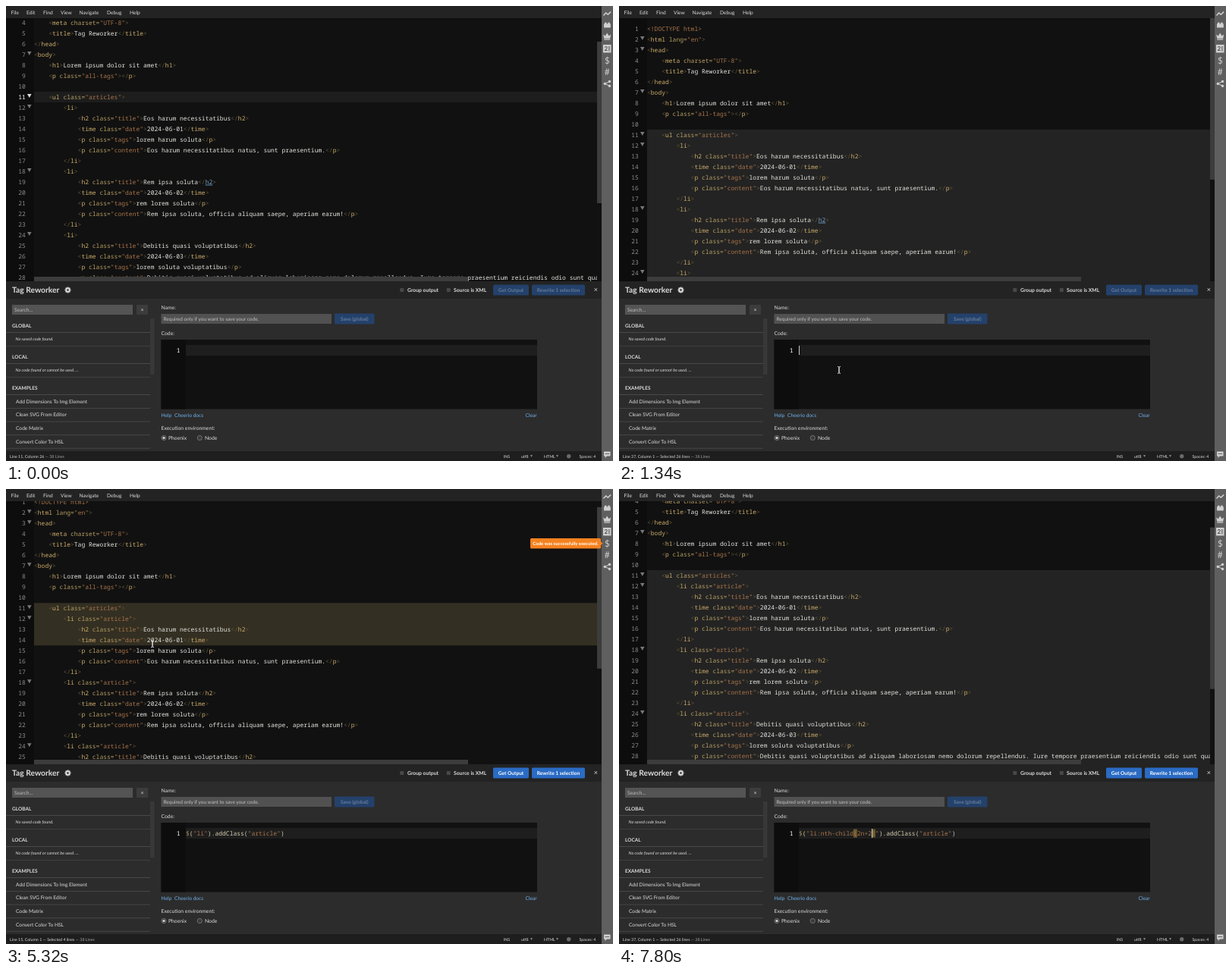
Animation of 800 by 600 pixels, one loop 8 s. Source, as an HTML page:

```html
<!DOCTYPE html>
<html lang="en">
<head>
<meta charset="UTF-8">
<title>Tag Reworker</title>
<style>
html, body { margin: 0; width: 100%; height: 100%; overflow: hidden; background: #111; }
svg { display: block; width: 100vw; height: 100vh; }
text { font-family: Lato, "Open Sans", sans-serif; fill: #dcdcdc; text-rendering: geometricPrecision; white-space: pre; }
.mono, .mono tspan { font-family: "Noto Sans Mono", "DejaVu Sans Mono", monospace; font-size: 8px; }
.br { fill: #62583a; }
.tag { fill: #cbab69; }
.attr { fill: #b69d62; }
.str { fill: #a8744a; }
.txt { fill: #e2e2de; }
.pun { fill: #d6ccb0; }
.dollar { fill: #96895c; }
.num { fill: #8c8c8c; }
.hot { fill: #fff; }
.match { fill: #6f9fc8; }
.line { text-decoration: underline; }
</style>
</head>
<body>
<svg id="stage" viewBox="0 0 800 600" preserveAspectRatio="none"></svg>
<script>
const LOOP = 8000, ROW = 14, TOP = 23, LEFT = 37, CH = 4.8;
const NAME = 'Tag Reworker';
const stage = document.getElementById('stage');
const $ = id => document.getElementById(id);
const esc = s => s.replace(/&/g, '&amp;').replace(/</g, '&lt;').replace(/>/g, '&gt;');

// ---- markup helpers ----
const rect = (x, y, w, h, fill, extra = '') =>
  `<rect x="${x}" y="${y}" width="${w}" height="${h}" fill="${fill}" ${extra}/>`;
const label = (x, cy, size, str, extra = '') =>
  `<text x="${x}" y="${cy + size * 0.35}" font-size="${size}" ${extra}>${esc(str)}</text>`;
const path = (d, extra) => `<path d="${d}" ${extra}/>`;
const span = (cls, s) => `<tspan class="${cls}">${esc(s)}</tspan>`;
const fill = c => `style="fill:${c}"`;

// ---- document being edited ----
const articles = [
  ['Eos harum necessitatibus', 'lorem harum soluta', 'Eos harum necessitatibus natus, sunt praesentium.'],
  ['Rem ipsa soluta', 'rem lorem soluta', 'Rem ipsa soluta, officia aliquam saepe, aperiam earum!'],
  ['Debitis quasi voluptatibus', 'lorem soluta voluptatibus', 'Debitis quasi voluptatibus ad aliquam laboriosam nemo dolorum repellendus. Iure tempore praesentium reiciendis odio sunt quam'],
  ['Magni omnis non', 'soluta omnis lorem', 'Magni omnis non maxime quis nisi officiis ab velit quo ipsum! Nam laborum molestias labore maiores vel deserunt quidem aperiam']
];
const doc = [
  '<!DOCTYPE html>', '<html lang="en">', '<head>', '    <meta charset="UTF-8">',
  `    <title>${NAME}</title>`, '</head>', '<body>',
  '    <h1>Lorem ipsum dolor sit amet</h1>', '    <p class="all-tags"></p>', '',
  '    <ul class="articles">'
];
articles.forEach(([title, tags, content], i) => doc.push(
  '        <li>',
  `            <h2 class="title">${title}</h2>`,
  `            <time class="date">2024-06-0${i + 1}</time>`,
  `            <p class="tags">${tags}</p>`,
  `            <p class="content">${content}</p>`,
  '        </li>'));
doc.push('    </ul>', '</body>', '</html>');
const folds = [2, 3, 7, 11, 12, 18, 24, 30];

const htmlToken = /<!.*>|<\/?|>|(?<=<\/?)\w+| \w+=|"[^"]*"|[^<>]+/g;
function paint(line) {
  let prev = '';
  return line.match(htmlToken).map(s => {
    const cls = s.startsWith('<!') ? 'str' : /^(<\/?|>)$/.test(s) ? 'br'
      : prev[0] === '<' ? 'tag' : /^ \w+=$/.test(s) ? 'attr' : s[0] === '"' ? 'str' : 'txt';
    prev = s;
    return span(cls, s);
  }).join('');
}
const rowMid = n => TOP + (n - 0.5) * ROW;
function codeRow(line, n, cls = '') {
  const body = line.trimStart();
  if (!body) return '';
  const x = LEFT + (line.length - body.length) * CH;
  return `<text class="mono ${cls}" x="${x}" y="${rowMid(n) + 2.7}">${paint(body)}</text>`;
}
function documentRows() {
  return doc.map((line, i) => {
    const n = i + 1;
    if (line.trim() === '<li>')
      return codeRow(line, n, 'before') + codeRow(line.replace('>', ' class="article">'), n, 'after');
    return codeRow(line, n, 'row' + n);
  }).join('');
}
function gutterRows() {
  const nums = doc.map((_, i) =>
    `<text id="num${i + 1}" class="mono num" text-anchor="end" x="25.8" y="${rowMid(i + 1) + 2.7}">${i + 1}</text>`);
  const marks = folds.map(n =>
    path(`M28 ${rowMid(n) - 4}h5.6l-2.8 5z`, `id="fold${n}" fill="#777"`));
  return nums.concat(marks).join('');
}

// ---- static interface ----
function menu() {
  const items = [['File', 6.5], ['Edit', 27], ['Find', 49], ['View', 72], ['Navigate', 96.5], ['Debug', 133], ['Help', 163]];
  return rect(0, 0, 785, 16, '#232323') + items.map(([s, x]) => label(x, 9, 6.65, s)).join('');
}
function sideIcons() {
  const c = '#d0d0d0', f = `fill="${c}"`, s = `fill="none" stroke="${c}"`;
  return rect(785, 0, 15, 600, '#5f5f5f') +
    path('M787.5 12.5l3.2-3.5 2.6 2.2 3.8-3.6', s + ' stroke-width="1.5"') +
    path('M788 28.5v-5h1v-1.8h2.6v1.8h1.6v-1.8h2.6v1.8h1v5z', f) +
    path('M787.2 37.5l2.6 2 2.4-4 2.4 4 2.6-2-1 5.2h-8zM788.2 43.5h8v1.3h-8z', f) +
    rect(787, 51, 10.5, 10.5, c) + label(788.4, 56.3, 8, '2', 'font-weight="700" ' + fill('#4a4a4a')) +
    rect(794.4, 53, 1, 6.5, '#4a4a4a') +
    label(792.3, 71.5, 11.5, '$', 'text-anchor="middle" ' + fill(c)) +
    label(792.3, 87, 12, '#', 'text-anchor="middle" ' + fill(c)) +
    path('M795.5 99.5l-6 3 6 3', s) +
    [[795.5, 99.5], [789.3, 102.5], [795.5, 105.5]].map(([x, y]) => `<circle cx="${x}" cy="${y}" r="1.7" ${f}/>`).join('') +
    path('M788 587.5h8.5v6h-4.5l-2.5 2.5v-2.5h-1.5z', f) + rect(789.5, 590, 5.5, 1, '#5f5f5f');
}
const button = (id, x, y, w, h, str) =>
  rect(x, y, w, h, '#24416b', `id="${id}" rx="1.5"`) +
  label(x + w / 2, y + h / 2, 6.6, str, `id="${id}Text" text-anchor="middle" font-weight="700" ` + fill('#657c98'));

function gear(x, y) {
  const teeth = [0, 45, 90, 135].map(a =>
    rect(x - 0.9, y - 4, 1.8, 8, '#dcdcdc', `transform="rotate(${a} ${x} ${y})"`)).join('');
  return teeth + `<circle cx="${x}" cy="${y}" r="2.9" fill="#dcdcdc"/><circle cx="${x}" cy="${y}" r="1.2" fill="#232323"/>`;
}
function panel() {
  const head = rect(0, 363, 785, 23, '#232323') + label(8, 374.8, 10.3, NAME, 'font-weight="700"') + gear(81.5, 374.5) +
    rect(519.3, 372, 5, 5, '#484848', 'rx=".8"') + label(529, 374.7, 6.8, 'Group output', 'font-weight="700"') +
    rect(580.8, 372, 5, 5, '#484848', 'rx=".8"') + label(590, 374.7, 6.8, 'Source is XML', 'font-weight="700"') +
    button('run', 642, 367.5, 47, 14, 'Get Output') + button('rewrite', 693, 367.5, 70, 14, 'Rewrite 1 selection') +
    label(777.3, 374, 9, '×', 'text-anchor="middle"');

  const heads = [['GLOBAL', 422], ['LOCAL', 463], ['EXAMPLES', 504]];
  const items = ['Add Dimensions To Img Element', 'Clean SVG From Editor', 'Code Matrix', 'Convert Color To HSL'];
  const it = 'font-style="italic"';
  const list = rect(8, 394, 159, 13, '#545454') + label(11, 400.5, 6.6, 'Search…', fill('#bdbdbd')) +
    rect(172, 394, 15, 13, '#3c3c3c', 'rx="1"') + label(179.5, 400.3, 7, '×', 'text-anchor="middle"') +
    rect(190, 412, 5.5, 74, '#383838') +
    heads.map(([s, y]) => label(8, y, 6.5, s, 'font-weight="700"') + rect(0, y + 8, 190, 1, '#494949')).join('') +
    label(12.5, 439.3, 5.6, 'No saved code found.', it) + label(12.5, 480.3, 5.6, 'No code found or cannot be used. …', it) +
    rect(0, 448, 190, 1, '#3e3e3e') + rect(0, 489, 190, 1, '#3e3e3e') +
    items.map((s, i) => label(13, 521.5 + i * 17.6, 6.65, s) + rect(0, 530 + i * 17.6, 190, 0.9, '#494949')).join('');

  const link = fill('#6fb1ee');
  const form = label(204.5, 398, 6.8, 'Name:') + rect(204.5, 406, 224.5, 13, '#515151') +
    label(207.5, 412.5, 6.5, 'Required only if you want to save your code.', fill('#c2c2c2')) +
    button('save', 433, 405.5, 52.5, 14, 'Save (global)') +
    label(204.5, 432, 6.8, 'Code:') + rect(204.5, 440, 495.5, 91.5, '#111') + rect(204.5, 440, 32.5, 91.5, '#0d0d0d') +
    rect(237, 447, 463, 14, '#1e1e1e') +
    '<text class="mono hot" text-anchor="end" x="229.5" y="456.7">1</text>' +
    '<g id="pairs"></g><text id="input" class="mono" x="237" y="456.7"></text>' + rect(0, 448, 0.9, 12, '#ddd', 'id="caret"') +
    label(204.5, 540, 6.65, 'Help', link) + label(222, 540, 6.65, 'Cheerio docs', link) + label(684.5, 540, 6.65, 'Clear', link) +
    label(204.5, 557, 6.8, 'Execution environment:') +
    '<g fill="#3a3a3a" stroke="#8a8a8a" stroke-width=".7"><circle cx="208" cy="569.5" r="3.1"/><circle cx="255.3" cy="569.5" r="3.1"/></g>' +
    '<circle cx="208" cy="569.5" r="1.6" fill="#ddd"/>' +
    label(214, 570, 6.8, 'Phoenix') + label(262, 570, 6.8, 'Node');

  return rect(0, 363, 785, 224, '#2c2c2c') + head + list + form;
}
function statusBar() {
  const s = 5.3, y = 593.7, down = x => path(`M${x} 592.3h3l-1.5 2.4z`, 'fill="#999"');
  return rect(0, 587, 785, 13, '#1e1e1e') +
    `<text x="5" y="${y + 1.9}" font-size="${s}"><tspan id="where"></tspan>${`<tspan style="fill:#a5a5a5"> — 38 Lines</tspan>`}</text>` +
    label(655.8, y, s, 'INS') + label(679, y, s, 'utf8') + down(691) + label(709, y, s, 'HTML') + down(725) +
    '<circle cx="741.7" cy="593.7" r="2.7" fill="#6a6a6a"/>' + label(755.5, y, s, 'Spaces: 4');
}
const toast = '<g id="toast">' + rect(691, 65, 93, 13.5, '#f5821f', 'rx="1.5"') + path('M783.5 69l3 2.7-3 2.7z', 'fill="#f5821f"') +
  label(737.5, 71.6, 6, 'Code was successfully executed.', 'text-anchor="middle" font-weight="700" ' + fill('#fff')) + '</g>';
const pointers = '<g id="beam" fill="none"><path d="M-2 -4.5q2 0 2 1.2v6.6q0 1.2 -2 1.2M2 -4.5q-2 0 -2 1.2v6.6q0 1.2 2 1.2" stroke="#e8e8e8" stroke-width=".9"/></g>' +
  '<g id="arrow"><path d="M0 0v8.4l2-1.8 1.3 2.9 1.4-.6-1.3-2.8h2.7z" fill="#111" stroke="#f2f2f2" stroke-width=".8"/></g>';

stage.innerHTML = '<clipPath id="view"><rect x="0" y="16" width="785" height="347"/></clipPath>' +
  rect(0, 0, 800, 600, '#111') + '<g clip-path="url(#view)">' + rect(0, 16, LEFT, 347, '#0d0d0d') +
  '<g id="code">' + rect(LEFT, TOP + 10 * ROW, 748, ROW, '#1d1d1d', 'id="shade"') + documentRows() + gutterRows() + '</g>' +
  '<g id="bar">' + rect(779, 16, 6, 347, '#111') + rect(779, 16, 6, 213, '#3c3c3c', 'id="thumb"') + '</g>' +
  rect(LEFT, 357, 572, 6, '#3c3c3c') + '</g>' +
  menu() + panel() + statusBar() + sideIcons() + toast + pointers;

const h2End = stage.querySelectorAll('.row19 .tag')[1];
const bodyTag = stage.querySelector('.row7 .tag');
const show = (el, on) => { el.style.display = on ? '' : 'none'; };

// ---- typing, with automatic closing of pairs ----
const states = [{ at: 0, text: '', caret: 0 }];
function type(str, times, caret) {
  let { text, caret: c } = states[states.length - 1];
  if (caret !== undefined) c = caret;
  [...str].forEach((ch, i) => {
    if (!(')"'.includes(ch) && text[c] === ch))
      text = text.slice(0, c) + ch + ({ '(': ')', '"': '"' }[ch] || '') + text.slice(c);
    c++;
    states.push({ at: times[i], text, caret: c });
  });
}
const every = (start, step, n) => Array.from({ length: n }, (_, i) => start + i * step);
type('$("li").add', [1440, 1580, 1880, 2140, 2200, 2260, 2320, 2500, 2640, 2760, 2880]);
type('Class("article")', every(3060, 52, 16));
states.push({ at: 6180, text: states[states.length - 1].text, caret: 5 });
type(':nth-child(2n+2', [6220, 6300, 6440, 6470, 6500, ...every(6640, 76, 6), ...every(7500, 100, 4)], 5);

function matchPair(text, c) {
  const p = '()'.includes(text[c - 1] || '#') ? c - 1 : '()'.includes(text[c] || '#') ? c : -1;
  if (p < 0) return [];
  const dir = text[p] === '(' ? 1 : -1;
  for (let i = p, depth = 0; i >= 0 && i < text.length; i += dir) {
    if (text[i] === '(') depth++;
    if (text[i] === ')') depth--;
    if (!depth) return [p, i];
  }
  return [];
}
const paintInput = text => (text.match(/"[^"]*"?|\$|\w+|./g) || [])
  .map(s => span(s[0] === '"' ? 'str' : s === '$' ? 'dollar' : 'pun', s)).join('');

// ---- motion tables: time, then values ----
const scrollKeys = [[0, 50], [300, 50], [580, 206], [900, 206], [1120, 0], [5290, 0], [5495, 206], [5720, 206], [5920, 56], [LOOP, 56]];
const mouseKeys = [
  [0, 185, 122], [60, 185, 122], [240, 191, 160], [520, 200, 262], [780, 205, 314], [920, 205, 314],
  [1020, 212, 335], [1200, 268, 455], [1320, 290, 480], [4079, 290, 480],
  [4080, 302, 453], [4140, 365, 444], [4240, 640, 398], [4320, 731, 380], [4650, 731, 380],
  [4720, 640, 345], [4860, 270, 200], [4960, 178, 173], [5200, 180, 173], [5320, 193, 204],
  [5540, 197, 272], [5640, 200, 314], [5800, 200, 314], [5980, 244, 410], [6100, 262, 455], [LOOP, 262, 455]
];
const smooth = p => p * p * (3 - 2 * p);
function at(keys, t, ease = p => p) {
  let i = 1;
  while (i < keys.length - 1 && keys[i][0] <= t) i++;
  const a = keys[i - 1], b = keys[i], p = ease((t - a[0]) / (b[0] - a[0]));
  return a.slice(1).map((v, k) => v + (b[k + 1] - v) * p);
}
const within = (t, a, b) => t >= a && t < b;
let lastText = null;

function drawEditor(t, scroll, my) {
  const active = t < 20 || within(t, 4980, 5080);
  const chosen = within(t, 20, 4480) || t >= 5080;
  const dragging = within(t, 20, 780) || within(t, 5080, 5660);
  const focused = within(t, 20, 1340) || within(t, 5080, 6160);
  const end = dragging ? Math.min(36, Math.max(11, Math.floor((my - TOP + scroll) / ROW) + 1)) : 36;

  $('code').setAttribute('transform', `translate(0 ${-scroll})`);
  $('thumb').setAttribute('y', 16 + scroll * 0.62);
  show($('bar'), !within(t, 780, 900));
  const shade = $('shade');
  show(shade, active || chosen);
  shade.setAttribute('height', active ? ROW : (end - 10) * ROW);
  shade.setAttribute('fill', active ? '#1d1d1d' : focused ? '#332f22' : '#232323');
  $('num11').setAttribute('class', 'mono ' + (active ? 'hot' : 'num'));
  $('fold11').setAttribute('fill', active ? '#ddd' : '#777');

  const done = t >= 4480;
  stage.querySelectorAll('.before').forEach(el => show(el, !done));
  stage.querySelectorAll('.after').forEach(el => show(el, done));
  folds.forEach(n => show($('fold' + n), n < 11 || !within(t, 4480, 4680)));
  h2End.setAttribute('class', done ? 'tag' : 'match line');
  bodyTag.setAttribute('class', within(t, 4480, 4980) ? 'match' : 'tag');
  $('where').textContent = active ? 'Line 11, Column 26' : `Line ${end + 1}, Column 1 — Selected ${end - 10} lines`;
}

function drawInput(t) {
  const { text, caret } = states.filter(s => s.at <= t).pop();
  const focused = within(t, 1340, 4470) || t >= 6160;
  if (text !== lastText) $('input').innerHTML = paintInput(lastText = text);
  $('pairs').innerHTML = focused
    ? matchPair(text, caret).map(i => rect(237 + i * CH, 448.5, CH, 11, '#6b5c2c')).join('') : '';
  $('caret').setAttribute('x', 237 + caret * CH);
  show($('caret'), focused && !within(t, 7260, 7500));
}

function drawMouse(t, x, y) {
  const seen = within(t, 20, 1440) || within(t, 4080, 6220);
  const overText = (y > 16 && y < 363 && x < 779) || (x > 204 && x < 700 && y > 440 && y < 531);
  show($('beam'), seen && overText);
  show($('arrow'), seen && !overText);
  ['beam', 'arrow'].forEach(id => $(id).setAttribute('transform', `translate(${x} ${y})`));

  const ready = t >= 1440;
  [['run', 642, 689], ['rewrite', 693, 763]].forEach(([id, a, b]) => {
    const hover = seen && x > a && x < b && y > 367 && y < 382;
    $(id).setAttribute('fill', !ready ? '#24416b' : hover ? '#3b8afa' : '#2a6bc4');
    $(id + 'Text').style.fill = ready ? '#fff' : '#657c98';
  });
}

function draw(t) {
  const [scroll] = at(scrollKeys, t, smooth);
  const [x, y] = at(mouseKeys, t);
  drawEditor(t, scroll, y);
  drawInput(t);
  drawMouse(t, x, y);
  show($('toast'), within(t, 4680, 6180));
}

const start = performance.now();
function tick() {
  draw((performance.now() - start) % LOOP);
  requestAnimationFrame(tick);
}
tick();
</script>
</body>
</html>
```
